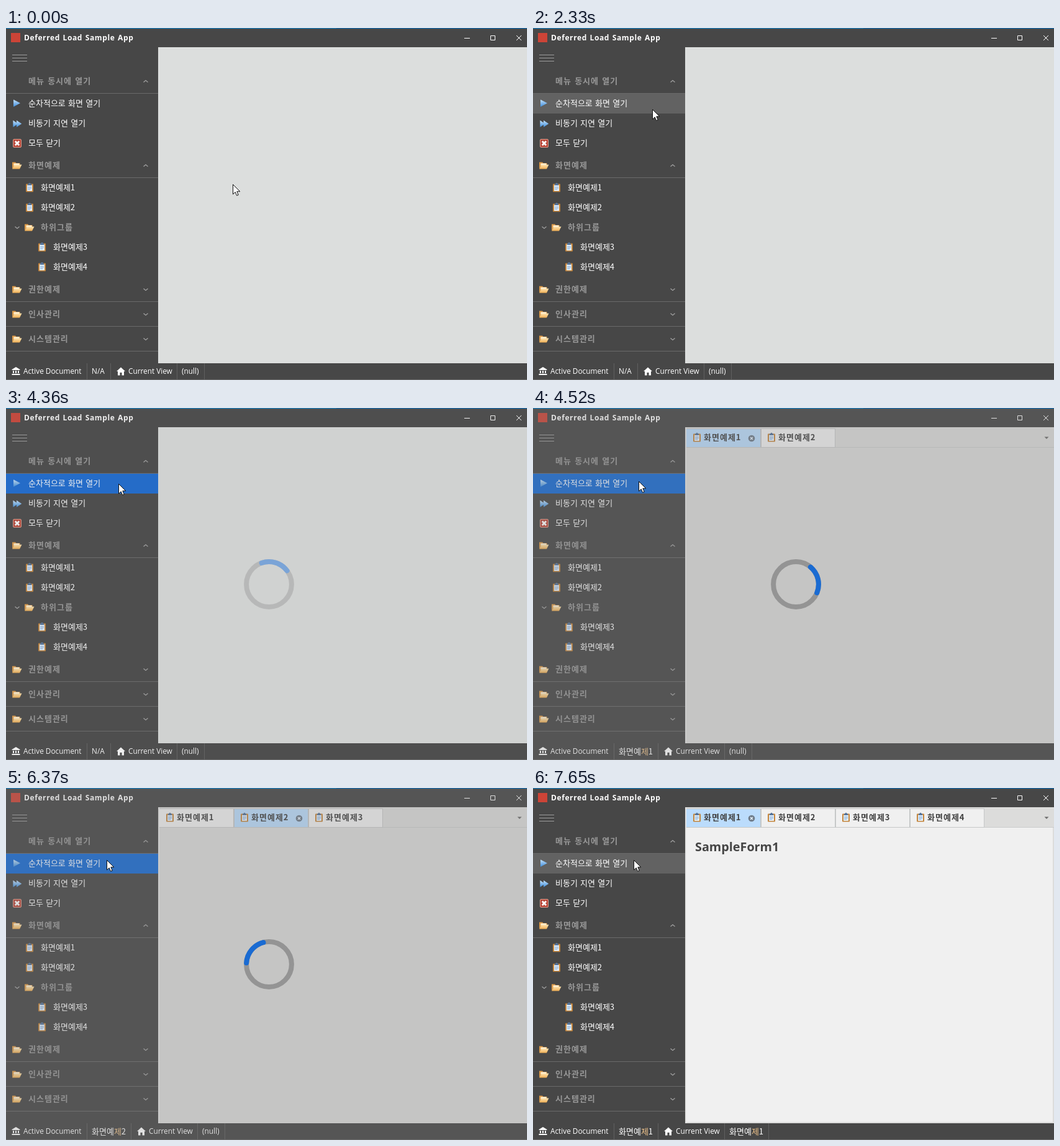
An HTML page for the animation above (8.09 s loop, 839 by 568 pixels).

```html
<!DOCTYPE html>
<html lang="ko">
<head>
<meta charset="utf-8">
<title>Deferred Load Sample App</title>
<style>
html, body { margin: 0; width: 100%; height: 100%; overflow: hidden; background: #474747; }
svg { display: block; width: 839px; height: 568px; }
text { white-space: pre; }
.ko { font: 13px "Noto Sans CJK KR", "Noto Sans CJK", sans-serif; word-spacing: .6px; fill: #fff; }
.head { font-weight: 700; letter-spacing: 1px; fill: #989898; }
.tab { font-weight: 700; letter-spacing: 1px; fill: #404040; }
.bar { font: 11.8px "Open Sans", "Noto Sans", sans-serif; fill: #fff; }
.title { font: 700 12px "Noto Sans", "Open Sans", sans-serif; letter-spacing: .6px; word-spacing: 1px; fill: #fff; }
.form { font: 700 19.8px "Noto Sans", "Open Sans", sans-serif; fill: #454545; }
</style>
</head>
<body>
<svg id="stage" viewBox="0 0 839 568">
  <defs>
    <linearGradient id="sky" x2="0" y2="1"><stop stop-color="#c4e2fb"/><stop offset="1" stop-color="#3f8ddb"/></linearGradient>
    <linearGradient id="gold" x2="0" y2="1"><stop stop-color="#ffe6b4"/><stop offset="1" stop-color="#f0ae52"/></linearGradient>
    <g id="folder">
      <path d="M.5 13V2.5H5.5L7 4H13V7H4Z" fill="#dd9a48"/>
      <path d="M3 4.5H12V8H3Z" fill="#fff3da"/>
      <path d="M.5 13.5L4 6.5H16L12.5 13.5Z" fill="url(#gold)"/>
    </g>
    <g id="clip">
      <rect x=".5" y="1.5" width="12" height="13" rx="1" fill="#c4853c"/>
      <rect x="2.5" y="3.5" width="8" height="9.5" fill="#e6f1fc"/>
      <path d="M3.5 6.5H9.5M3.5 8.5H9.5M3.5 10.5H8" stroke="#86add9"/>
      <path d="M3.5 1.5H5L5.5 0H7.5L8 1.5H9.5V4H3.5Z" fill="#54749c"/>
    </g>
    <path id="play" d="M.5 .5L11.5 6.3L.5 12.2Z" fill="url(#sky)"/>
    <g id="stop">
      <rect x=".5" y=".5" width="13" height="13" rx="1.5" fill="#b8483a" stroke="#dd9c8c"/>
      <path d="M3.8 3.8L10.2 10.2M10.2 3.8L3.8 10.2" stroke="#fff" stroke-width="2.8"/>
    </g>
    <path id="bank" d="M0 4L6.5 0L13 4V5H0ZM1.5 6H3.5V10H1.5ZM5.5 6H7.5V10H5.5ZM9.5 6H11.5V10H9.5ZM0 11H13V13H0Z" fill="#fff"/>
    <path id="house" d="M7 0L14 6.5H12V13H8.5V8.5H5.5V13H2V6.5H0Z" fill="#fff"/>
    <path id="up" d="M-3.5 1.5L0 -1.5L3.5 1.5" fill="none" stroke="#a0a0a0" stroke-width="1.3"/>
    <path id="down" d="M-3.5 -1.5L0 1.5L3.5 -1.5" fill="none" stroke="#a0a0a0" stroke-width="1.3"/>
  </defs>
  <rect width="839" height="568" fill="#474747"/>
  <rect id="row"/>
  <g id="chrome"></g>
  <rect x="245" y="31" width="594" height="510" fill="#dcdedd"/>
  <g id="tabs"></g>
  <g id="status"></g>
  <g id="veil">
    <rect width="839" height="567" fill="#808080" opacity=".25"/>
    <g fill="none" stroke-width="8" transform="translate(423.5 284.5)">
      <circle r="36.4" stroke="#949494"/>
      <circle id="arc" r="36.4" stroke="#1a6bd2" stroke-linecap="round" pathLength="360" stroke-dasharray="72 288"/>
    </g>
  </g>
  <rect width="532" height="1" fill="#0a7dc6"/>
  <rect x="532" width="307" height="1" fill="#0667b2"/>
  <rect y="567" width="839" height="1" fill="#6a6a6a"/>
  <path id="arrow" d="M.5 .5V16.2L4.2 12.8L6.6 18.4L9.2 17.3L6.8 11.8H11.8Z" fill="#fff" stroke="#111"/>
  <g id="busy" fill="none" transform="translate(162 116.5)">
    <circle r="7.7" stroke="#1c8ee6" stroke-width="4"/>
    <path d="M-7.7 0A7.7 7.7 0 0 1 0 -7.7" stroke="#35a5f2" stroke-width="3"/>
  </g>
</svg>
<script>
const LOOP = 8090;
const $ = id => document.getElementById(id);
const text = (x, y, cls, s) => `<text x="${x}" y="${y}" class="${cls}">${s}</text>`;
const use = (id, x, y) => `<use href="#${id}" x="${x}" y="${y}"/>`;
const box = (x, y, w, h, fill) => `<rect x="${x}" y="${y}" width="${w}" height="${h}" fill="${fill}"/>`;
const form = n => `화면예제${n}`;

function chrome() {
  let s = box(8, 8, 15, 15, '#cc4437') + text(29, 20, 'title', 'Deferred Load Sample App');
  s += '<path d="M738 16.5H747M780.5 12.5H787.5V19.5H780.5ZM822 12L830 20M830 12L822 20" fill="none" stroke="#fff"/>';
  for (const y of [43, 48, 53]) s += box(10, y, 24, 1, '#9c9c9c');
  for (const y of [105, 241, 441, 481, 521]) s += box(0, y, 245, 1, '#6a6a6a');

  const group = (name, y, mark, icon = true) => {
    if (icon) s += use('folder', 9.5, y - 7);
    s += text(36, y + 5, 'ko head', name) + use(mark, 225, y + 1);
  };
  group('메뉴 동시에 열기', 85, 'up', false);
  group('화면예제', 221, 'up');
  group('권한예제', 421, 'down');
  group('인사관리', 461, 'down');
  group('시스템관리', 501, 'down');

  s += use('play', 11.5, 115) + text(36, 126, 'ko', '순차적으로 화면 열기');
  s += `<g transform="translate(11 148.5) scale(.75 .95)">${use('play', 0, 0)}${use('play', 7.5, 0)}</g>`;
  s += text(36, 158, 'ko', '비동기 지연 열기');
  s += use('stop', 11, 179) + text(36, 190, 'ko', '모두 닫기');

  const leaf = (n, x, y) => s += use('clip', x, y - 7) + text(x + 24.5, y + 5, 'ko', form(n));
  leaf(1, 31.5, 257);
  leaf(2, 31.5, 289);
  s += use('down', 18, 322) + use('folder', 29.5, 314) + text(56, 326, 'ko head', '하위그룹');
  leaf(3, 51.5, 353);
  leaf(4, 51.5, 385);
  return s;
}

function tabs(count, active, loaded) {
  if (!count) return '';
  let s = box(245, 31, 594, 510, '#dcdcdb') + box(246, 31, 1, 510, '#e6e6e6') + box(247, 63, 592, 1, '#cbcccc');
  if (loaded) s += box(247, 64, 590, 475, '#f0f0f0') + text(261, 102, 'form', 'SampleForm1');
  for (let i = 0; i < count; i++) {
    const x = 247 + 120 * i, on = i + 1 === active;
    s += box(x, 33, 120, 31, '#c6c8c8') + box(x + (i ? 1 : 0), 34, i ? 118 : 119, 29, on ? '#bbdcfc' : '#f0f0f0');
    s += use('clip', x + 10.5, 40) + text(x + 28, 52, 'ko tab', form(i + 1));
    if (on) s += `<g transform="translate(${x + 105} 49)"><circle r="5.3" fill="#6f7c8a"/>` +
      '<path d="M-2 -2L2 2M2 -2L-2 2" stroke="#e4f0fc" stroke-width="1.5"/></g>';
  }
  return s + '<path d="M823.5 46.5H830.5L827 50Z" fill="#6c6c6c"/>';
}

function status(active, loaded) {
  const name = n => text(0, 0, 'ko', `화면예<tspan fill="#f3c68c">제</tspan>${n}`);
  const at = (x, y, s) => `<g transform="translate(${x} ${y})">${s}</g>`;
  const shift = active ? 33 : 0;
  let s = use('bank', 9.5, 547) + text(28, 558, 'bar', 'Active Document');
  s += active ? at(138, 558.5, name(active)) : text(138, 558, 'bar', 'N/A');
  s += use('house', 178 + shift, 547.5) + text(197 + shift, 558, 'bar', 'Current View');
  s += loaded ? at(316, 558.5, name(1)) : text(283 + shift, 558, 'bar', '(null)');
  for (const x of [130, 168 + shift, 275 + shift, loaded ? 379 : 319 + shift]) s += box(x, 541, 1, 26, '#606060');
  return s;
}

// Screen refresh times; everything holds between them.
const TICKS = [0, 920, 1070, 1230, 1380, 1530, 1690, 1850, 2010, 2170, 2330, 2650, 2770, 3090, 3250, 3410,
  4360, 4520, 4650, 4810, 4970, 5130, 5290, 5450, 5610, 5760, 5920, 6070, 6220, 6370,
  6530, 6690, 6850, 7010, 7170, 7330, 7490, 7650];
// Pointer tip at each refresh, until it comes to rest.
const POINTER = [[365, 252], [357, 248], [332, 231], [300, 205], [264, 177], [239, 157], [217, 147], [204, 141],
  [197, 136], [194, 133], [192, 131], [192, 129], [191, 128], [191, 127], [191, 126], [191, 126],
  [181, 122], [170, 118], [165, 117], [162, 116]];

const place = (el, attrs) => { for (const k in attrs) el.setAttribute(k, attrs[k]); };

function rowState(t) {
  if (t < 1530) return [138, 'none'];
  if (t < 2010) return [138, '#626262'];
  if (t < 3090 || t >= 7650) return [106, '#626262'];
  return [106, t < 3250 ? '#3d66a0' : '#186ad3'];
}

// Middle of the arc, in degrees clockwise from the top.
function spin(t) {
  return 59 + (t < 5450 ? 343 / 930 : 512 / 1880) * (t - 5450);
}

function veilLevel(t) {
  if (t < 4360 || t >= 7650) return 0;
  return t < 4520 ? .5 : t < 7490 ? 1 : .4;
}

let shown = -1;
function render(now) {
  const time = now % LOOP;
  const i = TICKS.findLastIndex(v => v <= time);
  if (i === shown) return;
  shown = i;

  const t = TICKS[i];
  const loaded = t >= 7490;
  const stage = t < 4520 ? 0 : t < 5450 ? 1 : t < 6530 ? 2 : 3;
  const active = loaded ? 1 : stage;
  const [y, fill] = rowState(t);
  place($('row'), { x: 0, y, width: 245, height: 32, fill });
  $('tabs').innerHTML = tabs(stage && stage + 1, active, loaded);
  $('status').innerHTML = status(active, loaded);

  place($('veil'), { opacity: veilLevel(t) });
  place($('arc'), { transform: `rotate(${spin(t) - 126})` });

  const busy = t >= 7010 && t < 7650;
  const [px, py] = POINTER[Math.min(i, POINTER.length - 1)];
  place($('arrow'), { transform: `translate(${px} ${py})`, opacity: busy ? 0 : 1 });
  place($('busy'), { opacity: busy ? 1 : 0 });
}

$('chrome').innerHTML = chrome();
const start = performance.now();
function frame() {
  render(performance.now() - start);
  requestAnimationFrame(frame);
}
frame();
</script>
</body>
</html>
```
